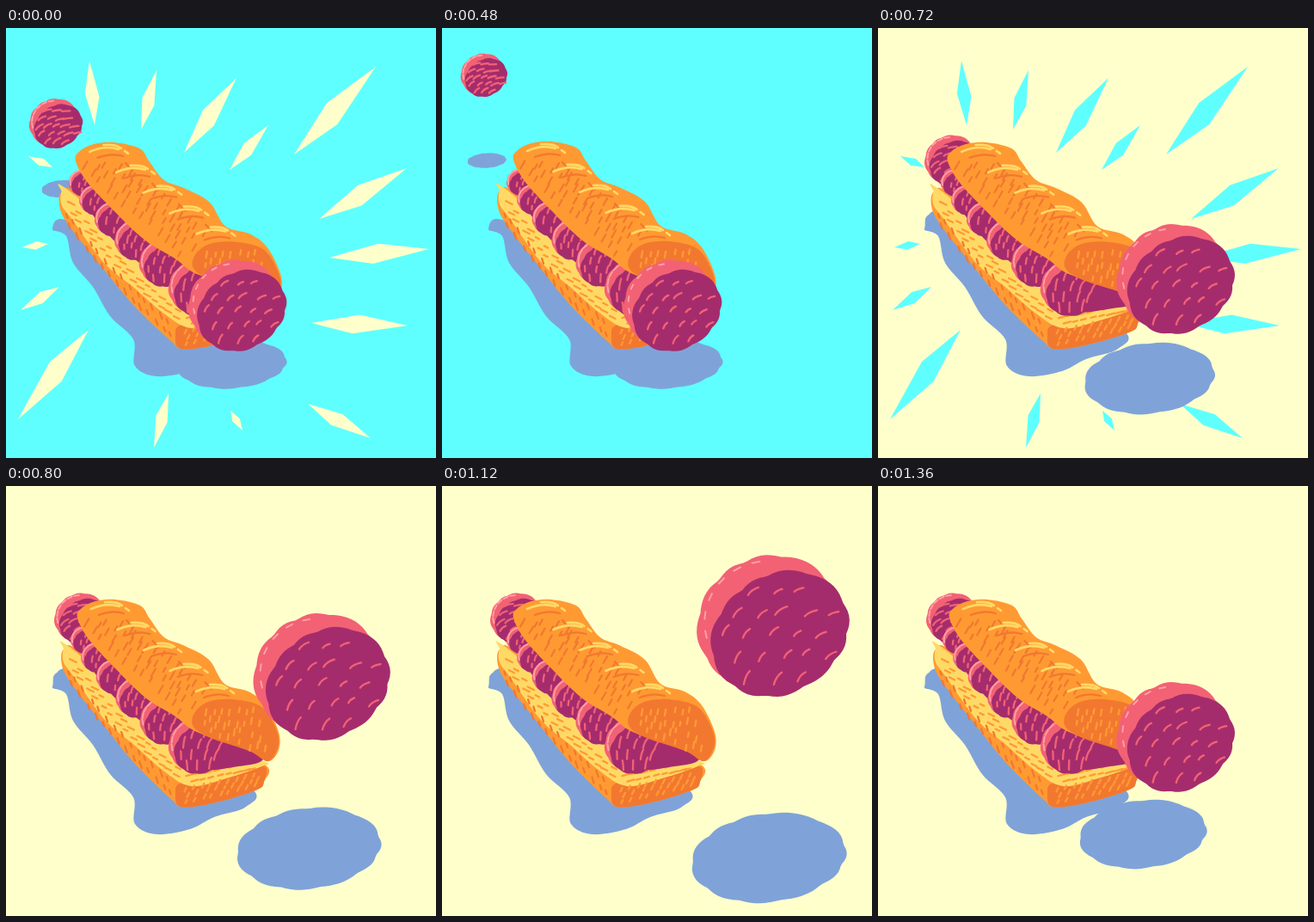
Recreate the animation shown at these times as an HTML page. Size 500 px wide and 500 px high, loop 1400 ms.

```html
<!DOCTYPE html>
<html lang="en">
<head>
<meta charset="utf-8">
<title>Meatball sub</title>
<style>
  html, body { margin: 0; width: 100%; height: 100%; overflow: hidden; }
  svg { display: block; width: 100vw; height: 100vh; }
</style>
</head>
<body>
<svg id="stage" viewBox="0 0 500 500"></svg>
<script>
const NS = 'http://www.w3.org/2000/svg';
const C = {
  cyan: '#5fffff', cream: '#ffffcc', shade: '#7fa3d8', bun: '#ff9a33', crust: '#f27830',
  crumb: '#ffd966', pink: '#f26274', meat: '#a52c6c', shine: '#ffa3a6'
};
const stage = document.getElementById('stage');

function add(parent, tag, attrs = {}) {
  const el = document.createElementNS(NS, tag);
  for (const k in attrs) el.setAttribute(k, attrs[k]);
  parent.appendChild(el);
  return el;
}
const fill = (parent, color, d) => add(parent, 'path', { d, fill: color });
const stroke = (parent, color, d, width = 2.3) => add(parent, 'path', {
  d, fill: 'none', stroke: color, 'stroke-width': width,
  'stroke-linecap': 'round', 'vector-effect': 'non-scaling-stroke'
});
const place = (el, x, y, sx, sy = sx) =>
  el.setAttribute('transform', `translate(${x} ${y}) scale(${sx} ${sy})`);
const mix = (a, b, t) => a + (b - a) * t;

// Repeatable noise from -1 to 1
let seed = 7;
function noise() {
  seed = (seed * 16807) % 2147483647;
  return seed / 1073741823.5 - 1;
}

// Closed smooth curve through key points
function blob(parent, color, p) {
  const n = p.length;
  let d = 'M' + p[0];
  for (let i = 0; i < n; i++) {
    const a = p[(i + n - 1) % n], b = p[i], c = p[(i + 1) % n], e = p[(i + 2) % n];
    d += `C${b[0] + (c[0] - a[0]) / 6},${b[1] + (c[1] - a[1]) / 6} ` +
         `${c[0] - (e[0] - b[0]) / 6},${c[1] - (e[1] - b[1]) / 6} ${c}`;
  }
  return fill(parent, color, d + 'Z');
}

// Scalloped oval, stretched towards its upper right and lower left
function lump(parent, color, cx, cy, rx, ry, skew, phase = 0) {
  const pts = [];
  for (let i = 0; i < 90; i++) {
    const a = i * Math.PI / 45;
    const r = .98 - skew * Math.sin(2 * a) + .035 * Math.abs(Math.sin(5.5 * a + phase + .4 * Math.sin(3 * a)));
    pts.push([cx + rx * r * Math.cos(a), cy + ry * r * Math.sin(a)]);
  }
  return fill(parent, color, 'M' + pts.join('L') + 'Z');
}

// Rows of short strokes between the lines a-b and c-d, both bent down by sag
function hatch(parent, color, [a, b, c, d], cols, rows, dx, dy, sag = 0) {
  let path = '';
  for (let j = 0; j < rows; j++) for (let i = 0; i < cols; i++) {
    const u = (i + .25 + .5 * (j % 2) + .2 * noise()) / cols;
    const v = rows > 1 ? j / (rows - 1) + .1 * noise() : .5;
    const x = mix(mix(a[0], b[0], u), mix(c[0], d[0], u), v);
    const y = mix(mix(a[1], b[1], u), mix(c[1], d[1], u), v) + sag * 4 * u * (1 - u);
    const k = 1 + .3 * noise();
    path += `M${x - dx * k / 2} ${y - dy * k / 2}l${dx * k} ${dy * k}`;
  }
  stroke(parent, color, path);
}

// Meatball of radius 1; tilt turns its strokes, in degrees
function meatball(parent, rows, size, tilt) {
  const g = add(parent, 'g');
  lump(g, C.pink, -.055, -.045, .93, .87, .04, 1);
  lump(g, C.meat, .09, .107, .885, .81, .09);
  let path = '', shine = '';
  for (let j = 0; j < rows; j++) for (let i = 0; i < rows; i++) {
    const x = ((i + .3 + .4 * (j % 2) + .15 * noise()) / rows - .5) * 1.8;
    const y = ((j + .5 + .15 * noise()) / rows - .5) * 1.7;
    if (Math.hypot(x, y) > .86) continue;
    const a = (tilt + 20 * (y - x)) * Math.PI / 180, k = size * (1 + .3 * noise());
    const u = k * Math.cos(a), v = -k * Math.sin(a);
    path += `M${.09 + x * .9 - u / 2} ${.1 + y * .83 - v / 2}q${u * .3} ${v * .7} ${u} ${v}`;
  }
  for (let i = 0; i < 6; i++) {
    const a = (165 + 18 * i) * Math.PI / 180;
    const at = b => `${-.055 + .84 * Math.cos(b)} ${-.045 + .8 * Math.sin(b)}`;
    shine += `M${at(a)}L${at(a + size * .8)}`;
  }
  stroke(g, C.pink, path);
  stroke(g, C.shine, shine, 1.9);
  return g;
}

// Each ray is a kite from its inner to its outer tip
function ray([x0, y0, x1, y1]) {
  const dx = x1 - x0, dy = y1 - y0, len = Math.hypot(dx, dy), w = (2.5 + .075 * len) / len;
  const side = (t, s) => `${x0 + dx * t - dy * s} ${y0 + dy * t + dx * s}`;
  return `M${x0} ${y0}L${side(.43, w)} ${x1} ${y1} ${side(.5, -w)}Z`;
}

const sky = add(stage, 'rect', { width: 500, height: 500 });
const rays = fill(stage, C.cream, [
  [103, 113, 97, 38], [157, 118, 175, 49], [207, 145, 268, 58], [260, 165, 305, 113], [335, 147, 430, 45],
  [364, 222, 466, 163], [376, 267, 492, 257], [355, 343, 467, 346], [351, 437, 424, 477], [261, 445, 275, 468],
  [189, 425, 172, 488], [96, 351, 14, 455], [62, 301, 17, 328], [49, 251, 19, 255], [54, 162, 26, 149]
].map(ray).join(''));

const shades = add(stage, 'g');
blob(shades, C.shade, [[54, 234], [75, 225], [180, 290], [284, 350], [279, 373], [242, 385], [214, 399],
  [175, 405], [150, 393], [148, 362], [121, 335], [101, 301], [78, 273], [70, 242]]);
const ballShade = () => lump(shades, C.shade, 0, 0, 89, 52, .07, 2);
const backShade = ballShade(), frontShade = ballShade();
const back = meatball(stage, 5, .27, 22);
const sub = add(stage, 'g');

function bottomBun() {
  blob(sub, C.bun, [[67, 190], [66, 212], [82, 238], [112, 276], [150, 323], [192, 364], [205, 373], [240, 369],
    [290, 354], [300, 344], [298, 322], [200, 290], [90, 195]]);
  blob(sub, C.crust, [[204, 345], [197, 358], [203, 373], [240, 369], [290, 354], [300, 344], [299, 326], [250, 341]]);
  blob(sub, C.crumb, [[67, 190], [75, 188], [200, 290], [297, 319], [297, 326], [256, 340], [215, 349],
    [183, 331], [149, 301], [115, 272], [79, 222], [67, 205]]);
  hatch(sub, C.bun, [[76, 200], [205, 332], [73, 206], [200, 338]], 15, 2, 6, 3, 10);
  hatch(sub, C.bun, [[210, 337], [292, 320], [212, 344], [290, 328]], 8, 2, 7, -2);
  hatch(sub, C.crust, [[70, 213], [196, 348], [71, 224], [194, 358]], 14, 2, 2, 6, 7);
  hatch(sub, C.bun, [[204, 353], [298, 335], [208, 367], [296, 346]], 9, 3, 2, -4);
}

function filling() {
  blob(sub, C.meat, [[84, 170], [120, 195], [220, 265], [297, 300], [298, 319], [270, 326], [222, 329],
    [190, 300], [130, 250], [92, 200]]);
  for (let i = 0; i < 6; i++) {
    const ball = meatball(sub, i < 3 ? 3 : 4, .3, 72);
    place(ball, 92 + 11 * i + 3.1 * i * i, 179 + 19 * i + 1.1 * i * i, 17 + 1.5 * i + .45 * i * i);
  }
}

function topBun() {
  blob(sub, C.bun, [[83, 153], [88, 142], [104, 134], [127, 132], [156, 139], [167, 154], [184, 176], [208, 186],
    [236, 202], [254, 230], [282, 239], [302, 255], [317, 286], [317, 307], [305, 320], [283, 308], [222, 286],
    [197, 268], [162, 246], [126, 211], [96, 178]]);
  blob(sub, C.crust, [[218, 280], [219, 264], [235, 251], [264, 248], [296, 256], [312, 278], [317, 300],
    [305, 320], [283, 308], [238, 293]]);
  hatch(sub, C.bun, [[231, 262], [296, 264], [229, 283], [306, 308]], 7, 4, -1, 6);
  hatch(sub, C.crust, [[92, 157], [212, 268], [128, 156], [232, 236]], 13, 4, -4, 7);
  for (let i = 0; i < 5; i++) {
    const x = 105 + 30.5 * i, y = 143 + 24 * i;
    stroke(sub, C.crumb, `M${x - 6} ${y}q17 -8 33 -3m-17 -5q14 -1 20 4m4 3l4 3`, 2.6);
    stroke(sub, C.crust, `M${x + 3} ${y + 7}q15 -6 29 -2m3 8l7 8`);
  }
}

bottomBun();
filling();
topBun();
const front = meatball(stage, 5, .15, 42);

const LOOP = 1400, POP = 720, R = 89;
const BEATS = [0, 40, 80, 160, 240, 320, 400, 480, 560, 600, 640, 680,
  720, 760, 800, 880, 960, 1040, 1120, 1200, 1280, 1320, 1360];
// Height of a toss, 1 at its top (u = 0) and 0 at u = -1 and 1
const lift = u => 1 - Math.abs(u) ** 2.6;

function draw(ms) {
  const t = BEATS.filter(b => b <= ms).pop();
  const hit = t === 0 || t === POP, second = t >= POP;
  sky.setAttribute('fill', second ? C.cream : C.cyan);
  rays.setAttribute('fill', second ? C.cyan : C.cream);
  rays.setAttribute('visibility', hit ? 'visible' : 'hidden');
  sub.setAttribute('transform', hit ? 'translate(195 373) scale(1.019 .996) translate(-195 -373)' : '');

  if (second) {
    const u = (t - 1040) / 320, k = lift(u);
    place(front, 346 + 40 * k, 291.7 - 133 * k, R * (.775 + .231 * k));
    place(frontShade, 311.8 + 71 * k - 3.75 * u, 406.2 + 27.2 * k - 1.25 * u,
      .83 + .175 * k - .01 * u, .775 + .23 * k - .015 * u);
    place(back, hit ? 86 : 88, 154, R * .36);
    place(backShade, 76, 224, .24, .28);
  } else {
    const u = (t - 320) / 320, k = lift(u);
    place(back, 59.8 - 14.2 * k + 1.75 * u, 115 + 4 * u - 74.5 * k, R * (.351 - .054 * k));
    place(backShade, 65 - 16 * k + u, 189 - 43 * k + 2 * u, .25, .19 - .03 * k);
    place(front, hit ? 269 : 268, 322.5, R * .645);
    place(frontShade, 263, 391, .7, .54);
  }
}

function tick() {
  draw(performance.now() % LOOP);
  requestAnimationFrame(tick);
}
draw(0);
requestAnimationFrame(tick);
</script>
</body>
</html>
```
